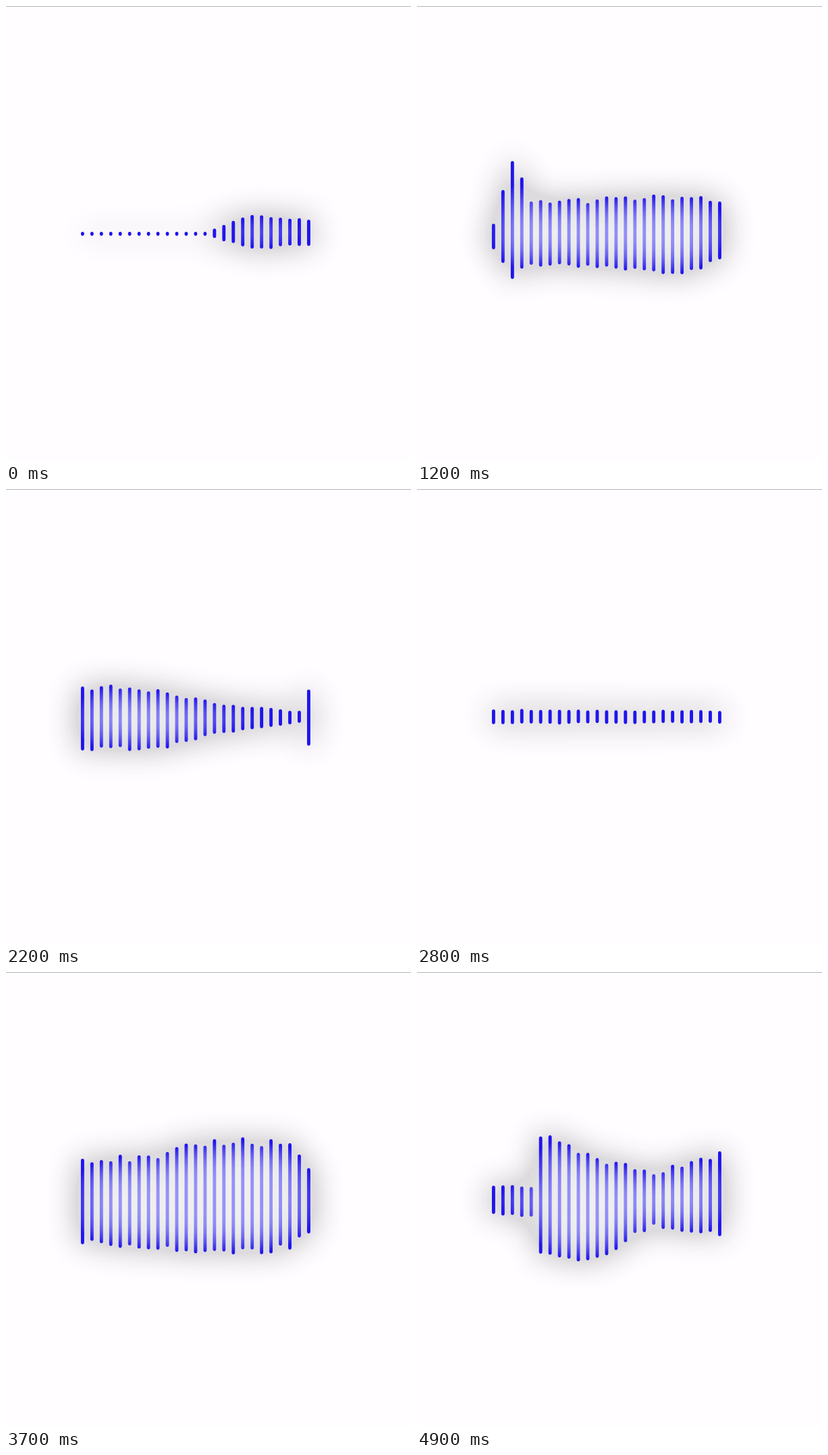
Animation, 600 px wide and 675 px high, one loop 5 s. Source, as an HTML page:

```html
<!DOCTYPE html>
<html lang="en">
<head>
<meta charset="utf-8">
<title>Voice waveform</title>
<style>
  html, body { margin: 0; width: 100%; height: 100%; overflow: hidden; background: #fffdff; }
  svg { display: block; width: 600px; height: 675px; }
</style>
</head>
<body>
<svg viewBox="0 0 600 675">
  <filter id="glow" filterUnits="userSpaceOnUse" x="0" y="0" width="600" height="675" color-interpolation-filters="sRGB">
    <feGaussianBlur in="SourceAlpha" stdDeviation="24" result="blur"/>
    <feComponentTransfer in="blur" result="shade">
      <feFuncA type="linear" slope="0.85"/>
    </feComponentTransfer>
    <!-- white haze only where the bars are dense -->
    <feComponentTransfer in="blur" result="dense">
      <feFuncA type="linear" slope="2.8" intercept="-0.45"/>
    </feComponentTransfer>
    <feFlood flood-color="#fff"/>
    <feComposite in2="dense" operator="in" result="haze"/>
    <feMerge>
      <feMergeNode in="shade"/>
      <feMergeNode in="haze"/>
      <feMergeNode in="SourceGraphic"/>
      <feMergeNode in="haze"/>
    </feMerge>
  </filter>
  <rect width="600" height="1" fill="#b4b3b7"/>
  <g filter="url(#glow)">
    <path id="bars" fill="none" stroke="#1f14ee" stroke-width="4.9" stroke-linecap="round"/>
  </g>
</svg>
<script>
const LOOP = 5000, TICK = 100, PER_TICK = 6, COUNT = 25;
const LEFT = 113.4, GAP = 13.96, MID = 338, CAP = 2.5;
const TOTAL = LOOP / TICK * PER_TICK + COUNT;

// Turns of the voice: [bar number, reach above, reach below the middle].
const VOICE = [
  [13, 3, 3], [18, 28, 22], [24, 21, 18],
  [32, 119, 122], [60, 60, 60], [72, 15, 23],
  [74, 108, 67], [76, 48, 46], [92, 55, 60], [96, 48, 38],
  [103, 100, 115], [132, 45, 50], [140, 41, 46], [147, 18, 24], [155, 9, 9],
  [157, 70, 70], [168, 11, 11], [196, 9, 9],
  [200, 70, 70], [222, 61, 66], [230, 62, 74], [236, 90, 76], [244, 84, 74], [246, 47, 50],
  [249, 103, 84], [258, 82, 90], [272, 28, 38],
  [281, 92, 115], [294, 21, 21], [298, 19, 25],
  [299, 94, 80], [305, 62, 86], [311, 38, 37], [318, 72, 54]
];

const noise = n => {
  const s = Math.sin(n * 12.9898) * 43758.5453;
  return (s - Math.floor(s)) * 2 - 1;
};

// Straight runs between the turns, roughened a little; side 1 is up, 2 down.
function envelope(side) {
  return Array.from({ length: TOTAL }, (_, i) => {
    const k = Math.max(1, VOICE.findIndex(v => v[0] >= i));
    const a = i > 318 ? VOICE.at(-1) : VOICE[k - 1], b = i > 318 ? a : VOICE[k];
    const p = a === b ? 0 : Math.max(0, (i - a[0]) / (b[0] - a[0]));
    const rough = p > 0 && p < 1 ? 1 + 0.1 * noise(i + side * 400) : 1;
    return Math.max(0, (a[side] + (b[side] - a[side]) * p) * rough - CAP);
  });
}

const up = envelope(1), down = envelope(2);
const bars = document.getElementById("bars");
let shown = -1;

function draw(now) {
  const first = Math.floor(now % LOOP / TICK) * PER_TICK;
  if (first === shown) return;
  shown = first;
  let d = "";
  for (let i = 0; i < COUNT; i++) {
    const n = first + i;
    d += `M${(LEFT + i * GAP).toFixed(2)} ${(MID - up[n]).toFixed(1)}v${(up[n] + down[n]).toFixed(1)}`;
  }
  bars.setAttribute("d", d);
}

const start = performance.now();
function loop() {
  draw(performance.now() - start);
  requestAnimationFrame(loop);
}
loop();
</script>
</body>
</html>
```
